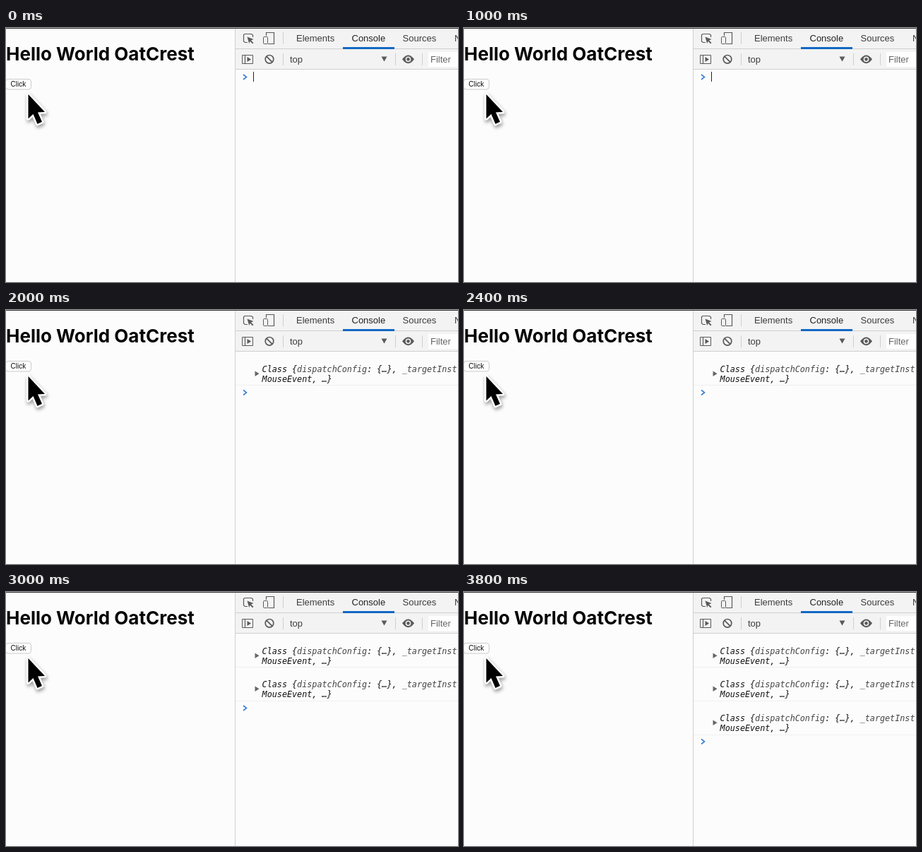
These frames come from a looping animation (640 by 360 pixels, 4000 ms). An HTML page with a canvas:

```html
<!DOCTYPE html>
<html lang="en">
<head>
<meta charset="utf-8">
<title>Console click demo</title>
<style>
  html, body { margin: 0; width: 100%; height: 100%; overflow: hidden; background: #fcfcfd; }
  canvas { display: block; }
</style>
</head>
<body>
<canvas id="stage" width="640" height="360"></canvas>
<script>
const ctx = document.getElementById('stage').getContext('2d');
const LOOP = 4000;
const LOG_TIMES = [1200, 2600, 3200];
const SANS = '"Liberation Sans", Arial, sans-serif';
const MONO = 'italic 11.75px "DejaVu Sans Mono", monospace';
const PAPER = '#fcfcfd', BAR = '#f3f3f3', RULE = '#cfcfcf', ICON = '#5a5a5a';

function rect(x, y, w, h, color) {
  ctx.fillStyle = color;
  ctx.fillRect(x, y, w, h);
}

function text(str, x, y, font, color) {
  ctx.font = font;
  ctx.fillStyle = color;
  ctx.fillText(str, x, y);
}

function trace(points, closed) {
  ctx.beginPath();
  points.forEach(([x, y]) => ctx.lineTo(x, y));
  if (closed) ctx.closePath();
}

function line(points, color, width, closed) {
  trace(points, closed);
  ctx.strokeStyle = color;
  ctx.lineWidth = width;
  ctx.stroke();
}

function fill(points, color) {
  trace(points, true);
  ctx.fillStyle = color;
  ctx.fill();
}

function box(x, y, w, h, r, back, edge) {
  ctx.beginPath();
  ctx.roundRect(x, y, w, h, r);
  if (back) {
    ctx.fillStyle = back;
    ctx.fill();
  }
  ctx.strokeStyle = edge;
  ctx.lineWidth = 1;
  ctx.stroke();
}

function pointer() {
  const arrow = [[31.5, 94], [31.5, 128.5], [38.5, 122], [44.5, 136], [51, 133], [45, 119.5], [55, 119]];
  ctx.save();
  ctx.lineJoin = 'round';
  ctx.shadowColor = 'rgba(0, 0, 0, 0.4)';
  ctx.shadowBlur = 5;
  ctx.shadowOffsetX = 1;
  ctx.shadowOffsetY = 3;
  line(arrow, '#fff', 5, true);
  ctx.restore();
  fill(arrow, '#000');
}

function page() {
  text('Hello World OatCrest', 0, 45.5, '700 26px Inter, sans-serif', '#050505');
  box(-0.5, 72.5, 36, 14.5, 3.5, '#fff', '#cacaca');
  text('Click', 6.5, 83, '10px ' + SANS, '#111');
  pointer();
}

function inspectIcon() {
  line([[342, 20.5], [338.5, 20.5], [336.5, 19], [336.5, 9.5], [338, 8.5], [347.5, 8.5], [349.5, 10], [349.5, 13]], ICON, 1.2);
  fill([[341.5, 12.5], [350.5, 16], [347, 17.4], [350.5, 21], [349, 22.3], [345.6, 18.8], [344.2, 22]], ICON);
}

function deviceIcon() {
  line([[368.5, 11], [368.5, 6.5], [379.5, 6.5], [379.5, 22.5], [371, 22.5]], ICON, 1.2);
  box(364.5, 12.5, 6, 10, 1, BAR, ICON);
}

function sidebarIcon() {
  box(334.5, 38.5, 15, 12, 0, null, ICON);
  line([[338.5, 38], [338.5, 51]], ICON, 1.2);
  fill([[341.5, 41], [347, 44.5], [341.5, 48]], ICON);
}

function clearIcon() {
  ctx.beginPath();
  ctx.arc(373, 44.3, 5.8, 0, Math.PI * 2);
  ctx.strokeStyle = ICON;
  ctx.lineWidth = 1.7;
  ctx.stroke();
  line([[369, 40.3], [377, 48.3]], ICON, 1.7);
}

function eyeIcon() {
  ctx.beginPath();
  ctx.moveTo(561, 44.3);
  ctx.quadraticCurveTo(569.5, 32.5, 578, 44.3);
  ctx.quadraticCurveTo(569.5, 56, 561, 44.3);
  ctx.fillStyle = ICON;
  ctx.fill();
  ctx.beginPath();
  ctx.arc(569.5, 44.3, 3.1, 0, Math.PI * 2);
  ctx.strokeStyle = BAR;
  ctx.lineWidth = 1.5;
  ctx.stroke();
}

function toolbar() {
  rect(325, 1, 315, 57, BAR);
  rect(325, 29, 315, 1, RULE);
  rect(325, 58, 315, 1, RULE);
  rect(477, 27, 73, 3, '#1268c4');
  inspectIcon();
  deviceIcon();
  sidebarIcon();
  clearIcon();
  eyeIcon();
  rect(392, 6, 1, 17, RULE);
  [392, 551, 589].forEach(x => rect(x, 36, 1, 17, RULE));

  const font = '13px ' + SANS;
  text('Elements', 411, 19, font, '#3c3c3c');
  text('Console', 489.5, 19, font, '#222');
  text('Sources', 561.5, 19, font, '#3c3c3c');
  text('Network', 635, 19, font, '#3c3c3c');
  text('top', 402, 48.5, font, '#3c3c3c');
  fill([[531.5, 40.5], [539.5, 40.5], [535.5, 47.5]], ICON);
  rect(598, 34, 42, 21, '#fefefe');
  text('Filter', 601, 49, font, '#666');
}

function entry(i) {
  const y = Math.floor(i * 47.5);
  fill([[352.5, y + 86.5], [358.5, y + 90.3], [352.5, y + 94]], '#666');
  const parts = [['Class {', '#111'], ['dispatchConfig', '#444'], [': {…}, ', '#111'], ['_targetInst', '#444']];
  ctx.font = MONO;
  let x = 362.6;
  for (const [str, color] of parts) {
    text(str, x, y + 88, MONO, color);
    x += ctx.measureText(str).width;
  }
  text('MouseEvent, …}', 362.6, y + 102, MONO, '#111');
  rect(325, 106 + i * 48, 315, 1, '#f0f0f0');
}

function consolePane(t) {
  const count = LOG_TIMES.filter(at => t >= at).length;
  for (let i = 0; i < count; i++) entry(i);
  const y = count ? 117 + (count - 1) * 47.5 : 69.5;
  line([[336, y - 3.5], [340.5, y], [336, y + 3.5]], '#3b7fd0', 1.6);
  if (!count) rect(350, 62, 1, 14, '#222');
}

function draw(t) {
  rect(0, 0, 640, 360, PAPER);
  page();
  toolbar();
  consolePane(t);
  rect(324, 1, 1, 359, RULE);
  rect(0, 0, 640, 1, '#3c3c3c');
}

const start = performance.now();
function frame() {
  draw((performance.now() - start) % LOOP);
  requestAnimationFrame(frame);
}
frame();
</script>
</body>
</html>
```
